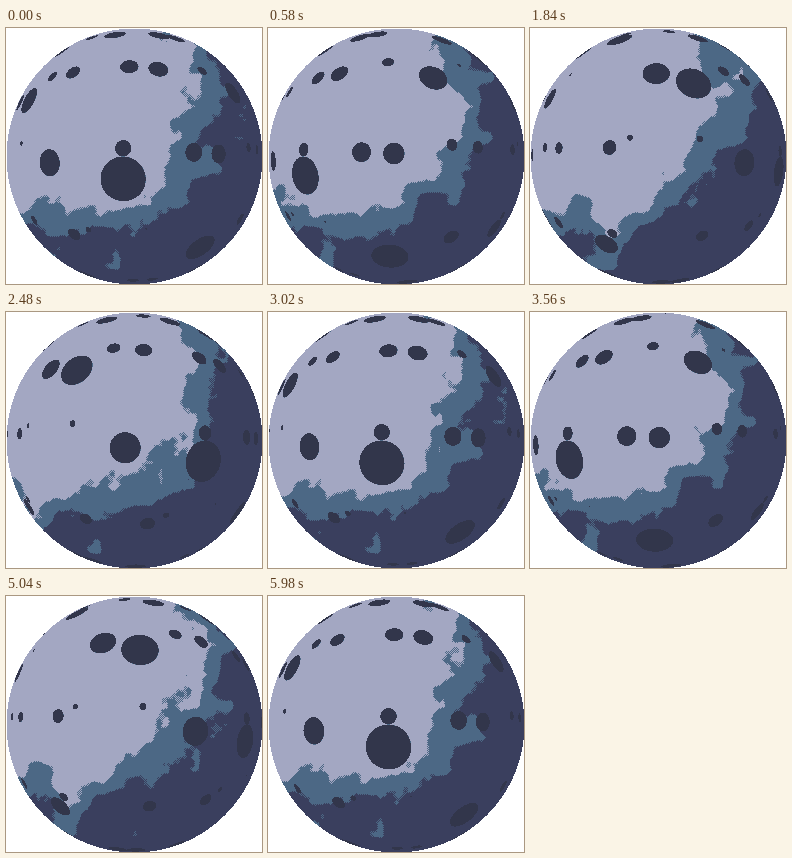
Recreate the animation shown at these times as an HTML page with a canvas. Size 256 by 256 pixels, loop 6 s.

```html
<!DOCTYPE html>
<html lang="en">
<head>
<meta charset="utf-8">
<title>Turning moon</title>
<style>
  html, body { margin: 0; width: 100%; height: 100%; overflow: hidden; background: #fff; }
  canvas { display: block; width: 100%; height: 100%; image-rendering: pixelated; }
</style>
</head>
<body>
<canvas id="moon" width="256" height="256"></canvas>
<script>
const SIZE = 256, STEP_MS = 20, STEPS = 300, SEED = 2.92;
const LIGHT = 0.25, CRATER_CELLS = 5, GROUND_CELLS = 8;
const RIM_SHIFT = (LIGHT - 0.5) * 0.03;

// Packed as little-endian RGBA.
const pack = hex => (0xff000000 | (hex & 255) << 16 | (hex & 0xff00) | hex >> 16) >>> 0;
const BRIGHT = pack(0xa3a7c2), MIDDLE = pack(0x4c6885), DARK = pack(0x3a3f5e);
const PIT = MIDDLE, PIT_SHADE = pack(0x32364b);

const fract = v => v - Math.floor(v);

function hashGrid(cells) {
  return Float64Array.from({ length: cells * cells }, (_, i) => {
    const x = i % cells, y = Math.floor(i / cells);
    return fract(Math.sin(x * 12.9898 + y * 78.233) * 15.5453 * SEED);
  });
}
const groundHash = hashGrid(GROUND_CELLS);
const craterHash = hashGrid(CRATER_CELLS);

function noise(x, y) {
  const ix = Math.floor(x), iy = Math.floor(y);
  const fx = x - ix, fy = y - iy;
  const sx = fx * fx * (3 - 2 * fx), sy = fy * fy * (3 - 2 * fy);
  const x0 = ix & 7, x1 = (ix + 1) & 7;
  const row0 = (iy & 7) * 8, row1 = ((iy + 1) & 7) * 8;
  const a = groundHash[row0 + x0], b = groundHash[row0 + x1];
  const c = groundHash[row1 + x0], d = groundHash[row1 + x1];
  const top = a + (b - a) * sx, bottom = c + (d - c) * sx;
  return top + (bottom - top) * sy;
}

function fbm(x, y) {
  let sum = 0;
  for (let octave = 0, gain = 0.5; octave < 4; octave++, gain /= 2) {
    sum += noise(x, y) * gain;
    x *= 2;
    y *= 2;
  }
  return sum;
}

// One pit per cell; its hash sets both place and radius. 0 inside, 1 outside.
function pitMask(x, y) {
  const row = Math.floor(y);
  x += row * 0.31;
  const col = Math.floor(x);
  const h = craterHash[(row % CRATER_CELLS) * CRATER_CELLS + col % CRATER_CELLS];
  const r = h * 0.25, middle = 0.25 + h * 0.5;
  const dist = Math.hypot(x - col - middle, y - row - middle);
  if (dist >= r) return 1;
  const k = Math.max(0, (dist - 0.9 * r) / (0.1 * r));
  return k * k * (3 - 2 * k);
}

function crater(u, v, shift) {
  const x = u * CRATER_CELLS + shift, y = v * CRATER_CELLS;
  return 1 - pitMask(x + 11, y + 11) * pitMask(x + 12, y + 12);
}

// Everything about a pixel that does not change with time.
const points = [];
for (let j = 0; j < SIZE; j++) {
  for (let i = 0; i < SIZE; i++) {
    const u = i / SIZE, v = j / SIZE;
    if (Math.hypot(u - 0.5, v - 0.5) > 0.49999) continue;
    const cx = u * 2 - 1, cy = v * 2 - 1;
    const depth = 1 + Math.sqrt(1 - cx * cx - cy * cy);
    const warp = fbm(u, v);
    points.push({
      index: j * SIZE + i,
      light: Math.hypot(u - LIGHT, v - LIGHT),
      gx: u * GROUND_CELLS + warp,
      gy: v * GROUND_CELLS + warp,
      su: cx / depth * 0.5 + 0.5,
      sv: cy / depth * 0.5 + 0.5,
      border: (i + j) % 2 ? 0 : 2 / SIZE
    });
  }
}

function groundColor(p, turn) {
  const shade = p.light + 0.3 * fbm(p.gx + turn * GROUND_CELLS, p.gy);
  if (shade > 0.729) return shade < 0.729 + p.border ? MIDDLE : DARK;
  if (shade > 0.615) return shade < 0.615 + p.border ? BRIGHT : MIDDLE;
  return BRIGHT;
}

function pixelColor(p, turn) {
  const shift = turn * CRATER_CELLS;
  const inside = crater(p.su, p.sv, shift);
  if (inside < 0.5) return groundColor(p, turn);
  if (p.light > 0.465) return PIT_SHADE;
  const rim = crater(p.su + RIM_SHIFT, p.sv + RIM_SHIFT, shift);
  return rim < inside - (0.5 - inside) * 2 ? PIT_SHADE : PIT;
}

const ctx = document.getElementById("moon").getContext("2d");
const image = ctx.createImageData(SIZE, SIZE);
const pixels = new Uint32Array(image.data.buffer);
const start = performance.now();
let shown = -1;

function draw(now) {
  const step = Math.floor(Math.max(0, now - start) / STEP_MS + 1e-6) % STEPS;
  if (step !== shown) {
    shown = step;
    const turn = 2 * step / STEPS;
    for (const p of points) pixels[p.index] = pixelColor(p, turn);
    ctx.putImageData(image, 0, 0);
  }
  requestAnimationFrame(draw);
}
draw(start);
</script>
</body>
</html>
```
